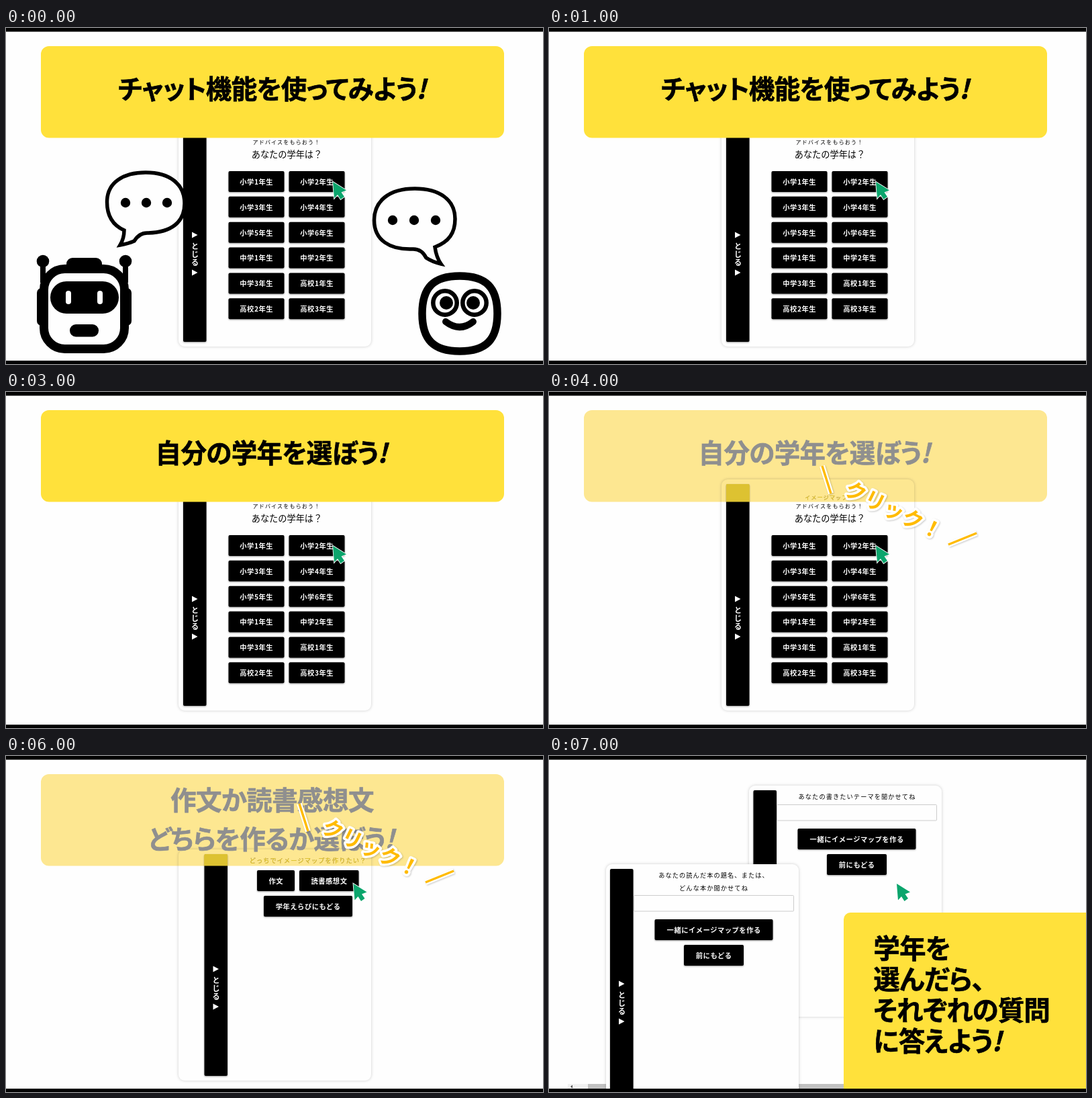
An HTML page for the animation above (8 s loop, 800 by 500 pixels).

```html
<!DOCTYPE html>
<html lang="ja">
<head>
<meta charset="utf-8">
<style>
html, body { margin: 0; height: 100%; overflow: hidden; background: #fefefe; }
svg { display: block; width: 100vw; height: 100vh; }
text { font-family: "Noto Sans CJK JP", "Noto Sans CJK", sans-serif; white-space: pre; }
.title { font-size: 38.5px; font-weight: 700; letter-spacing: -.6px; font-feature-settings: "palt"; stroke-width: .7; }
.answer .title { font-size: 39.3px; }
.title .bang { font-style: italic; font-weight: 900; }
.label { font-size: 10.3px; font-weight: 700; letter-spacing: .5px; fill: #fff; text-anchor: middle; }
.small { font-size: 8px; letter-spacing: 1.2px; font-weight: 500; text-anchor: middle; }
.prompt { font-size: 9.2px; letter-spacing: 1.1px; font-weight: 500; text-anchor: middle; }
.ask { font-size: 13.2px; font-weight: 500; text-anchor: middle; }
.side { font-size: 11px; font-weight: 700; fill: #fff; text-anchor: middle; }
.pop { font-size: 31.5px; font-weight: 900; }
.card { fill: #fefefe; filter: drop-shadow(0 0 2px #0003); }
.button { filter: drop-shadow(0 1px 1px #0006); }
.line { fill: #fefefe; stroke: #000; }
</style>
</head>
<body>
<svg id="stage" viewBox="0 0 800 500"></svg>
<script>
const YELLOW = '#ffe13b', ORANGE = '#ffbb00';

const rect = (x, y, w, h, r = 0, attrs = '') =>
  `<rect x="${x}" y="${y}" width="${w}" height="${h}" rx="${r}" ${attrs}/>`;
const circle = (x, y, r, attrs = '') => `<circle cx="${x}" cy="${y}" r="${r}" ${attrs}/>`;
const text = (cls, x, y, s, attrs = '') => `<text class="${cls}" x="${x}" y="${y}" ${attrs}>${s}</text>`;
const title = (x, y, s, fill = '#000') =>
  text('title', x, y, s.replace('!', '<tspan class="bang" dx="-1">!</tspan>'), `fill="${fill}" stroke="${fill}"`);

const card = (x, y) => rect(x, y, 287, 344, 9, 'class="card"');

function sidebar(x, y) {
  const arrow = dy => `<path d="M${x + 13} ${y + dy - 4.5}l8.5 4.5l-8.5 4.5z" fill="#fff"/>`;
  return rect(x, y, 34.5, 330, 2, 'class="button"') + arrow(171) + arrow(227) +
    [...'とじる'].map((c, i) => text('side', x + 17.5, y + 192 + i * 12.2, c)).join('');
}

const button = (x, y, w, label) =>
  rect(x, y, w, 31, 2, 'class="button"') + text('label', x + w / 2 + .2, y + 19.8, label);

const cursor = (x, y) =>
  `<path transform="translate(${x} ${y})" d="M0 0L20 12.5L12.5 15.5L17 22L11.5 26L7 19L2 24.5Z"
    fill="#0ba56c" stroke="#fff" stroke-width="1.8" paint-order="stroke"/>`;

const gradePanel = card(257, 130) + sidebar(264, 137) +
  text('small', 418, 160, 'イメージマップの') +
  text('small', 418, 172.5, 'アドバイスをもらおう！') +
  text('ask', 418.5, 192.5, 'あなたの学年は？') +
  ['小学1', '小学2', '小学3', '小学4', '小学5', '小学6', '中学1', '中学2', '中学3', '高校1', '高校2', '高校3']
    .map((g, i) => button(i % 2 ? 421.5 : 331.5, 213 + (i >> 1) * 37.85, 83, g + '年生')).join('') +
  cursor(487, 229);

const kindPanel = card(257, 139) + sidebar(295.5, 146) +
  text('prompt', 450, 158.5, 'どっちでイメージマップを作りたい？') +
  button(374, 170, 56, '作文') + button(437, 170, 88.5, '読書感想文') +
  button(384, 208, 132, '学年えらびにもどる') + cursor(517.5, 190);

const form = (x, y) => rect(x + .5, y + .5, 238, 23.5, 1, 'fill="#fefefe" stroke="#ccc"') +
  button(x + 31.5, y + 36, 176, '一緒にイメージマップを作る') +
  button(x + 75, y + 74, 89, '前にもどる');

const formPanels = card(298, 44) + sidebar(304.5, 51) +
  text('prompt', 459, 64, 'あなたの書きたいテーマを聞かせてね') + form(339, 72) + cursor(518, 190) +
  rect(28, 488, 420, 8, 0, 'fill="#f1f1f1"') + rect(58, 488, 390, 8, 0, 'fill="#c1c1c1"') +
  '<path d="M35 489.5v5l-3-2.5z" fill="#555"/>' +
  card(85, 161) + sidebar(91, 168) +
  text('prompt', 245.5, 181, 'あなたの読んだ本の題名、または、') +
  text('prompt', 245.5, 199.5, 'どんな本か聞かせてね') + form(126, 207) +
  rect(439, 233, 380, 280, 10, `fill="${YELLOW}"`) + '<g class="answer">' +
  ['学年を', '選んだら、', 'それぞれの質問', 'に答えよう!'].map((s, i) => title(483.5, 300.5 + i * 46, s)).join('') + '</g>';

const plate = attrs => rect(52, 27, 690, 136.5, 12, attrs);
const banner = lines => plate(`fill="${YELLOW}"`) + lines.map(l => title(...l)).join('');
// Half-gone banner as blended in linear light.
const fadedBanner = lines => plate('fill="#fee892" style="mix-blend-mode:multiply"') +
  plate('fill="#ddc231" style="mix-blend-mode:lighten"') + lines.map(l => title(...l, '#8f8f8f')).join('');

function clickMark(x, y) {
  const ticks = 'M-80 -119L-67 -78M108 -2L150 -19';
  const outlined = `fill="${ORANGE}" stroke="#fff" stroke-width="7" stroke-linejoin="round" paint-order="stroke"`;
  return `<g transform="translate(${x} ${y})" style="filter:drop-shadow(1px 1px 1px #0003)">
    <path d="${ticks}" stroke="#fff" stroke-width="8"/><path d="${ticks}" stroke="${ORANGE}" stroke-width="3.5"/>
    <g transform="translate(-30 -81) rotate(26)">${text('pop', -15.5, 11.8, 'クリック！', outlined)}</g></g>`;
}

const robot = rect(46, 387, 20, 56, 7) + rect(167, 387, 20, 56, 7) + rect(90, 342, 53, 26, 9) +
  [55, 178].map(x => circle(x, 347, 9.3) + rect(x - 4, 347, 8, 32)).join('') +
  rect(56.5, 358.5, 120, 119, 31, 'class="line" stroke-width="13"') +
  rect(66, 377, 102, 48, 24) + rect(95, 441, 43, 18.5, 9) +
  [89, 136].map(x => rect(x, 391, 8, 20, 4, 'fill="#fff"')).join('');

const buddy = '<path class="line" stroke-width="11.5" d="M620 425C620 386 637 369 676 369S732 386 732 425S715 481 676 481S620 464 620 425Z"/>' +
  [[654, 656], [698, 696]].map(([x, pupil]) =>
    circle(x, 409, 17.7, 'class="line" stroke-width="6.5"') + circle(pupil, 409, 10)).join('') +
  '<path d="M655 437Q676 453 696 437" fill="none" stroke="#000" stroke-width="10" stroke-linecap="round"/>';

const bubble = (d, xs, y) => `<path class="line" stroke-width="5.5" d="${d}"/>` +
  xs.map(x => circle(x, y, 7.2)).join('');

const friends = robot + buddy +
  bubble('M176 301C158 293 150.500 278 150.500 259C150.500 229 176 215 208 215C245 215 266 233 266 261C266 290 245 304 212 305Q199 304 191 317Q182 321 170 323Q176 313 176 301Z', [178, 209, 240], 260) +
  bubble('M639 326C660 318 669 305 669 284C669 255 645 239 609 239C570 239 548.500 258 548.500 286C548.500 316 572 330 605 329Q619 328 626 342Q635 348 648 351Q641 341 639 326Z', [576, 608, 640], 286);

const intro = [[167, 105, 'チャット機能を使ってみよう!']];
const pickGrade = [[222.5, 105, '自分の学年を選ぼう!']];
const pickKind = [[245, 79.5, '作文か読書感想文'], [212, 137.5, 'どちらを作るか選ぼう!']];

const scenes = [
  gradePanel + banner(intro) + friends,
  gradePanel + banner(intro),
  gradePanel,
  gradePanel + banner(pickGrade),
  gradePanel + fadedBanner(pickGrade) + clickMark(487, 229),
  kindPanel + banner(pickKind),
  kindPanel + fadedBanner(pickKind) + clickMark(517, 190),
  formPanels,
];

const stage = document.getElementById('stage');
stage.innerHTML = rect(0, 0, 800, 500, 0, 'fill="#fefefe"') +
  scenes.map(s => `<g class="scene" display="none">${s}</g>`).join('') +
  rect(0, 0, 800, 5.5) + rect(0, 495, 800, 5);
const groups = stage.querySelectorAll('.scene');

const start = performance.now();
function draw() {
  const current = Math.floor((performance.now() - start) / 1000) % scenes.length;
  groups.forEach((g, i) => g.setAttribute('display', i === current ? 'inline' : 'none'));
  requestAnimationFrame(draw);
}
draw();
</script>
</body>
</html>
```
